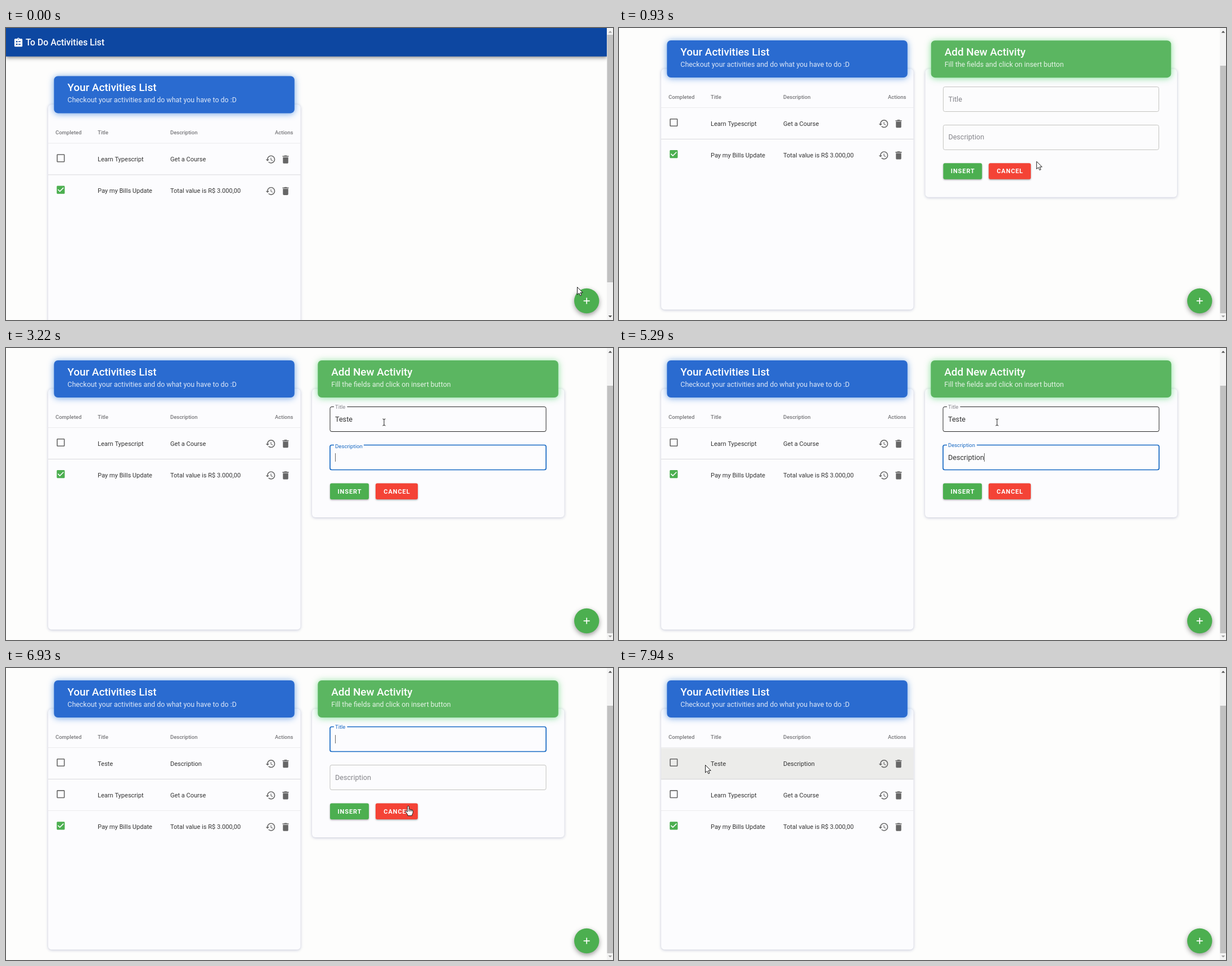
Animation, 1079 px wide and 519 px high, one loop 7990 ms. Source, as an HTML page with a canvas:

```html
<!DOCTYPE html>
<html lang="en">
<head>
<meta charset="utf-8">
<title>To Do Activities List</title>
<style>
html, body { margin: 0; width: 100%; height: 100%; overflow: hidden; background: #fdfdfd; }
canvas { display: block; width: 1079px; height: 519px; }
</style>
</head>
<body>
<canvas id="stage" width="1079" height="519"></canvas>
<script>
const stage = document.getElementById('stage').getContext('2d');
const layer = document.createElement('canvas');
layer.width = 1079;
layer.height = 519;
const layerCtx = layer.getContext('2d');
let ctx = stage;

const LOOP = 7990, SCROLL = 63.4, Z = 0.79;
const INSERTED = 5600, CLOSE = 7180;
const BLUE = '#1769c3', GREEN = '#4caf50';

const ICON = {
  history: new Path2D('M13 3c-4.97 0-9 4.03-9 9H1l3.89 3.89.07.14L9 12H6c0-3.87 3.13-7 7-7s7 3.13 7 7-3.13 7-7 7c-1.93 0-3.68-.79-4.94-2.06l-1.42 1.42C8.27 19.99 10.51 21 13 21c4.97 0 9-4.03 9-9s-4.03-9-9-9zm-1 5v5l4.28 2.54.72-1.21-3.5-2.08V8H12z'),
  bin: new Path2D('M6 19c0 1.1.9 2 2 2h8c1.1 0 2-.9 2-2V7H6v12zM19 4h-3.5l-1-1h-5l-1 1H5v2h14V4z'),
  box: new Path2D('M19 5v14H5V5h14m0-2H5c-1.1 0-2 .9-2 2v14c0 1.1.9 2 2 2h14c1.1 0 2-.9 2-2V5c0-1.1-.9-2-2-2z'),
  checked: new Path2D('M19 3H5c-1.1 0-2 .9-2 2v14c0 1.1.9 2 2 2h14c1.1 0 2-.9 2-2V5c0-1.1-.9-2-2-2zm-9 14l-5-5 1.41-1.41L10 14.17l7.59-7.59L19 8l-9 9z'),
  clipboard: new Path2D('M19 3h-4.2C14.4 1.8 13.3 1 12 1S9.6 1.8 9.2 3H5a2 2 0 0 0-2 2v14a2 2 0 0 0 2 2h14a2 2 0 0 0 2-2V5a2 2 0 0 0-2-2zm-7 0a1 1 0 0 1 0 2a1 1 0 0 1 0-2zM7 8h3v3H7zM12 8.5h5v2h-5zM7 14h3v3H7zM12 14.5h5v2h-5z')
};
const POINTER = {
  arrow: new Path2D('M0 0V13.5L3.2 10.6L5.4 15.4L7.6 14.4L5.5 9.8H9.8Z'),
  hand: new Path2D('M-1.4 1Q0-.7 1.3 1V6.2Q2.8 5.4 3.8 6.8Q5.2 6 6.2 7.4Q8.2 6.9 8.4 9V11.5Q8.3 14 6.8 15.5V17.5H-1V15.5L-4.9 10.6Q-5.3 8.7-3.4 9L-1.4 10.8Z')
};

const clamp = v => Math.max(0, Math.min(1, v));
const ramp = (t, start, len) => clamp((t - start) / len);
const smooth = p => p * p * (3 - 2 * p);
const easeOut = p => 1 - Math.pow(1 - p, 3);

// time, x, y of the pointer
const PATH = [
  [130, 1015, 461], [270, 1028, 478], [380, 1028, 478], [700, 746, 244],
  [860, 746, 244], [1350, 672, 132], [5950, 672, 132], [6640, 704, 226],
  [6900, 714, 247], [7230, 714, 247], [7530, 642, 210], [7930, 153, 173]
];
function pointerAt(t) {
  let a = PATH[0];
  for (const b of PATH) {
    if (t < b[0]) {
      const p = smooth(ramp(t, a[0], b[0] - a[0]));
      return [a[1] + (b[1] - a[1]) * p, a[2] + (b[2] - a[2]) * p];
    }
    a = b;
  }
  return [a[1], a[2]];
}

const TITLE_KEYS = [1950, 2120, 2290, 2450, 2600];
const DESC_KEYS = [3720, 4020, 4260, 4360, 4460, 4560, 4660, 4760, 4860, 4980, 5120];
function typed(word, keys, t) {
  return t < INSERTED ? word.slice(0, keys.filter(k => k <= t).length) : '';
}
function caretOn(t, start, keys) {
  const last = Math.max(start, ...keys.filter(k => k <= t));
  return (t - last) % 1060 < 530;
}

// Draws a group as one flat picture, then blends it onto the stage.
function faded(alpha, paint) {
  if (alpha >= 1) return paint();
  const base = stage.getTransform();
  layerCtx.clearRect(0, 0, 1079, 519);
  layerCtx.setTransform(base);
  ctx = layerCtx;
  paint();
  layerCtx.resetTransform();
  ctx = stage;
  stage.save();
  stage.resetTransform();
  stage.globalAlpha = alpha;
  stage.drawImage(layer, 0, 0);
  stage.restore();
}

function text(s, x, y, size, color, weight = 400) {
  ctx.font = `${weight} ${size}px Roboto, sans-serif`;
  ctx.fillStyle = color;
  ctx.fillText(s, x, y);
}
function shadow(color, blur, dy) {
  ctx.shadowColor = color;
  ctx.shadowBlur = blur;
  ctx.shadowOffsetY = dy;
}
function noShadow() { shadow('transparent', 0, 0); }
function panel(x, y, w, h, r, fill) {
  ctx.beginPath();
  ctx.roundRect(x, y, w, h, r);
  ctx.fillStyle = fill;
  ctx.fill();
}
function rect(x, y, w, h, fill) {
  ctx.fillStyle = fill;
  ctx.fillRect(x, y, w, h);
}
function icon(path, cx, cy, color) {
  ctx.save();
  ctx.translate(cx - 12 * Z, cy - 12 * Z);
  ctx.scale(Z, Z);
  ctx.fillStyle = color;
  ctx.fill(path, 'evenodd');
  ctx.restore();
}

function card(x, h, color, glow, title, sub) {
  shadow('rgba(60,70,130,.3)', 5, 1);
  panel(x, 72.5, 448.5, h, 6, '#fcfcfe');
  shadow(glow, 12, 1);
  panel(x + 10.3, 22, 427.5, 66, 7, color);
  noShadow();
  text(title, x + 34.3, 49, 18.9, '#fff', 500);
  text(sub, x + 34.3, 69, 12.45, 'rgba(255,255,255,.84)');
}

function drawRow(y, done, title, desc, hover) {
  if (hover) rect(75, y + 0.5, 448.5, 56, '#ececea');
  icon(done ? ICON.checked : ICON.box, 97.3, y + 26, done ? GREEN : '#666');
  text(title, 163, y + 31.5, 11.06, '#333');
  text(desc, 292, y + 31.5, 11.06, '#333');
  icon(ICON.history, 470.4, y + 28.2, '#686868');
  icon(ICON.bin, 497, y + 28.2, '#666');
}

function drawList(t, px, py) {
  card(75, 428, '#2a6bd0', 'rgba(25,110,215,.62)', 'Your Activities List',
    'Checkout your activities and do what you have to do :D');
  const heads = [['Completed', 88], ['Title', 163], ['Description', 292], ['Actions', 478]];
  for (const [s, x] of heads) text(s, x, 126, 9.48, '#77777a', 500);
  const rows = [[false, 'Learn Typescript', 'Get a Course'],
                [true, 'Pay my Bills Update', 'Total value is R$ 3.000,00']];
  if (t >= INSERTED) rows.unshift([false, 'Teste', 'Description']);
  rows.forEach((r, i) => {
    const y = 142 + i * 56.2;
    const hover = px > 75 && px < 523 && py > y && py < y + 56;
    drawRow(y, ...r, hover);
  });
  rows.forEach((r, i) => rect(75, Math.floor(141.5 + i * 56.2), 448.5, 1, i === 1 ? '#d9d9dc' : '#ebebed'));
}

function field(y, label, value, focus, hover, lift, caret) {
  const x = 575.5, w = 385, h = 45, k = 1 - 0.25 * lift;
  const open = lift > 0.01;
  ctx.strokeStyle = focus ? BLUE : hover ? '#262626' : '#c3c3bf';
  ctx.lineWidth = focus ? 1.7 : 1;
  ctx.beginPath();
  ctx.roundRect(x + 0.5, y + 0.5, w - 1, h - 1, 3);
  ctx.stroke();
  ctx.font = '400 9.48px Roboto, sans-serif';
  if (open) rect(x + 7.5, y - 2, ctx.measureText(label).width + 5, 4.5, '#fcfcfe');
  if (!value || open) {
    text(label, 585, y + 26.5 - 22.2 * lift, 12.64 * k, focus ? BLUE : '#85858a');
  }
  text(value, 585, y + 26.5, 12.64, '#333');
  if (focus && caret) {
    ctx.font = '400 12.64px Roboto, sans-serif';
    rect(Math.ceil(585 + ctx.measureText(value).width), y + 15, 1, 15, '#666');
  }
}

function button(x, w, s, fill) {
  shadow('rgba(0,0,0,.35)', 3, 1.3);
  panel(x, 240.5, w, 28.5, 3, fill);
  noShadow();
  ctx.textAlign = 'center';
  ctx.letterSpacing = '0.9px';
  text(s, x + w / 2 + 0.45, 258.7, 11.06, '#fff', 700);
  ctx.letterSpacing = '0px';
  ctx.textAlign = 'left';
}

function drawForm(t, e, px, py) {
  ctx.save();
  ctx.translate(768, 153);
  ctx.scale(e, e);
  ctx.translate(-768, -153);
  card(544, 228.5, '#5bb661', 'rgba(60,205,90,.62)', 'Add New Activity',
    'Fill the fields and click on insert button');
  const inBox = y => px > 576 && px < 960 && py > y && py < y + 45;
  const again = t >= INSERTED;
  const onTitle = t >= 1560 && t < 3100 || again;
  const onDesc = t >= 3100 && !again;
  const descLift = again ? 1 - easeOut(ramp(t, INSERTED, 200)) : easeOut(ramp(t, 3100, 200));
  field(104, 'Title', typed('Teste', TITLE_KEYS, t), onTitle, inBox(104),
    easeOut(ramp(t, 1560, 200)), caretOn(t, again ? 5800 : 1560, again ? [] : TITLE_KEYS));
  field(172, 'Description', typed('Description', DESC_KEYS, t), onDesc, inBox(172),
    descLift, caretOn(t, 3100, DESC_KEYS));
  button(576, 69, 'INSERT', GREEN);
  button(657, 75, 'CANCEL', '#f44336');
  ctx.restore();
}

function drawBar() {
  shadow('rgba(0,0,0,.45)', 7, 2);
  rect(0, 0, 1068, 50.6, '#0d47a1');
  noShadow();
  icon(ICON.clipboard, 22, 26.2, '#fff');
  text('To Do Activities List', 35, 31, 15.8, '#fff', 500);
}

function drawFab() {
  shadow('rgba(0,0,0,.4)', 8, 3);
  ctx.beginPath();
  ctx.arc(1032.2, 485, 22.2, 0, 7);
  ctx.fillStyle = GREEN;
  ctx.fill();
  noShadow();
  rect(1026.7, 484.2, 11, 1.7, '#fff');
  rect(1031.35, 479.5, 1.7, 11, '#fff');
}

function drawScrollbar(s) {
  const tip = (y, d, color) => {
    ctx.beginPath();
    ctx.moveTo(1070.7, y);
    ctx.lineTo(1077.3, y);
    ctx.lineTo(1074, y + 3.4 * d);
    ctx.fillStyle = color;
    ctx.fill();
  };
  rect(1068, 0, 11, 519, '#f3f3f3');
  rect(1068.5, 12 + 55 * s, 10.5, 440, '#c1c1c1');
  tip(8.5, -1, s > 0 ? '#505050' : '#a3a3a3');
  tip(511, 1, s < 1 ? '#505050' : '#a3a3a3');
}

function drawPointer(x, y, e) {
  const inside = (l, t, r, b) => x > l && x < r && y > t && y < b;
  const open = e > 0.95;
  if (open && (inside(576, 104, 960, 149) || inside(576, 172, 960, 217))) {
    ctx.strokeStyle = '#222';
    ctx.lineWidth = 1;
    ctx.beginPath();
    for (const d of [-1, 1]) {
      ctx.moveTo(x - 2.5, y + 6 * d);
      ctx.quadraticCurveTo(x, y + 6 * d, x, y + 4.5 * d);
      ctx.quadraticCurveTo(x, y + 6 * d, x + 2.5, y + 6 * d);
    }
    ctx.moveTo(x, y - 5);
    ctx.lineTo(x, y + 5);
    ctx.stroke();
    return;
  }
  const hand = Math.hypot(x - 1032, y - 485) < 22 ||
    open && (inside(576, 240, 645, 269) || inside(657, 240, 732, 269));
  const shape = hand ? POINTER.hand : POINTER.arrow;
  ctx.save();
  ctx.translate(x + (hand ? 1 : 0.5), y - (hand ? 2 : 0.5));
  ctx.fillStyle = '#fff';
  ctx.fill(shape);
  ctx.strokeStyle = '#1c1c1c';
  ctx.lineWidth = 1;
  ctx.lineJoin = 'round';
  ctx.stroke(shape);
  if (hand) {
    ctx.beginPath();
    for (const k of [1.3, 3.8, 6.2]) {
      ctx.moveTo(k, 6.5);
      ctx.lineTo(k, 10);
    }
    ctx.stroke();
  }
  ctx.restore();
}

function draw(t) {
  const s = smooth(ramp(t, 420, 230));
  const enter = easeOut(ramp(t, 600, 380));
  const e = enter * (1 - smooth(ramp(t, CLOSE, 220)));
  const fab = t < 400 ? 1 : Math.max(1 - ramp(t, 400, 200) * 0.5, enter);
  const [px, py] = pointerAt(t);
  const drop = SCROLL * (1 - s);
  rect(0, 0, 1079, 519, '#fdfdfc');
  ctx.save();
  ctx.translate(0, drop);
  drawList(t, px, py - drop);
  if (e > 0.01) faded(e, () => drawForm(t, e, px, py));
  ctx.restore();
  ctx.save();
  ctx.translate(0, drop - SCROLL);
  drawBar();
  ctx.restore();
  faded(fab, drawFab);
  drawScrollbar(s);
  drawPointer(px, py, e);
}

const begin = performance.now();
function tick(now) {
  draw(Math.max(0, now - begin) % LOOP);
  requestAnimationFrame(tick);
}
draw(0);
requestAnimationFrame(tick);
</script>
</body>
</html>
```
